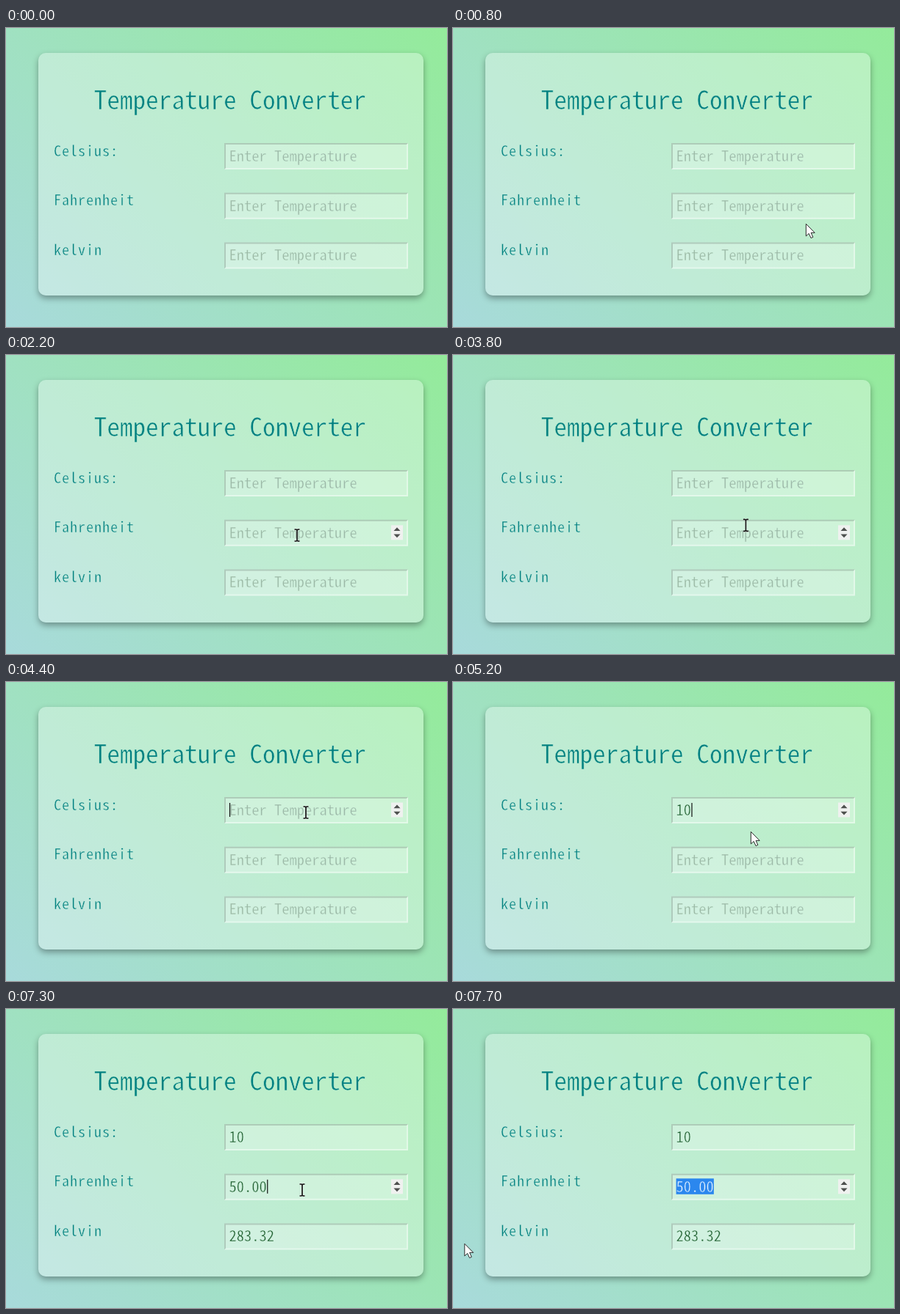
These frames come from a looping animation (600x408 px, 8 s). An HTML page:

```html
<!DOCTYPE html>
<html lang="en">
<head>
<meta charset="utf-8">
<title>Temperature Converter</title>
<style>
  html, body { margin: 0; width: 100%; height: 100%; overflow: hidden; }
  body { position: relative; background: linear-gradient(45deg, #a8dadb, #94eb9b); }
  .card {
    position: absolute; left: 44px; top: 34px; width: 524px; height: 331px;
    border-radius: 10px; background: rgba(255, 255, 255, .33);
    box-shadow: 0 4px 9px rgba(0, 0, 0, .34);
  }
  svg { position: absolute; left: 0; top: 0; }
  /* A hairline stroke in the ground colour slims the letters. */
  text {
    font-family: "Noto Sans Mono CJK KR", "Noto Sans Mono CJK JP", "Noto Sans Mono CJK SC",
      "Liberation Mono", monospace;
    fill: #008080; white-space: pre;
  }
  .title { font-size: 35.3px; stroke: #bbecd1; stroke-width: .7px; }
  .label { font-size: 20px; letter-spacing: 1px; stroke: #bfe9da; stroke-width: .4px; }
  .entry { font-size: 20.5px; font-weight: 300; stroke: #cdf0db; stroke-width: .45px; }
</style>
</head>
<body>
<div class="card"></div>
<svg id="stage" width="600" height="408" viewBox="0 0 600 408">
  <text class="title" x="119.5" y="111">Temperature Converter</text>
</svg>
<script>
const LOOP = 8000, STEP = 100;
const TEXT_X = 303.6, CHAR = 10.25;
const stage = document.getElementById('stage');

function add(parent, tag, attrs = {}, text = '') {
  const node = document.createElementNS('http://www.w3.org/2000/svg', tag);
  for (const name in attrs) node.setAttribute(name, attrs[name]);
  node.textContent = text;
  return parent.appendChild(node);
}

function show(node, on) {
  node.setAttribute('visibility', on ? 'visible' : 'hidden');
}

// One labelled number field; y is the top edge of its box.
function makeField(label, y) {
  add(stage, 'text', { class: 'label', x: 65, y: y + 17.5 }, label);
  const g = add(stage, 'g', { transform: `translate(0 ${y})` });
  add(g, 'rect', { x: 297, y: 0, width: 250, height: 36, fill: '#fff', 'fill-opacity': .27 });
  add(g, 'path', { d: 'M297 36V0H547L545 2H299V34Z', fill: '#6b7d72', 'fill-opacity': .33 });
  add(g, 'path', { d: 'M547 0V36H297L299 34H545V2Z', fill: '#fff', 'fill-opacity': .4 });
  const mark = add(g, 'rect', { y: 6.5, height: 21.5, fill: '#2b87ee' });
  const text = add(g, 'text', { class: 'entry', x: TEXT_X, y: 25 });
  const plain = add(text, 'tspan');
  const chosen = add(text, 'tspan', { fill: '#e4f2ff', stroke: '#2b87ee' });
  chosen.style.stroke = '#2b87ee';
  const caret = add(g, 'rect', { y: 8, width: 1.2, height: 19, fill: '#111' });
  const spin = add(g, 'g');
  add(spin, 'rect', { x: 524, y: 7.5, width: 16, height: 20, fill: '#eff1ef' });
  add(spin, 'path', { d: 'M527.5 15.3L532 10.5L536.5 15.3ZM527.5 19.7L532 24.5L536.5 19.7Z', fill: '#4d504e' });

  return {
    contains: (x, py) => x >= 297 && x <= 547 && py >= y && py <= y + 36,
    draw(value, caretOn, spinOn, selectFrom = value.length) {
      plain.textContent = value ? value.slice(0, selectFrom) : 'Enter Temperature';
      plain.setAttribute('fill', value ? '#1f5f30' : '#9bb8a6');
      chosen.textContent = value.slice(selectFrom);
      mark.setAttribute('x', TEXT_X + selectFrom * CHAR);
      mark.setAttribute('width', (value.length - selectFrom) * CHAR);
      caret.setAttribute('x', TEXT_X + value.length * CHAR + .3);
      show(caret, caretOn);
      show(spin, spinOn);
    }
  };
}

const celsius = makeField('Celsius:', 157);
const fahrenheit = makeField('Fahrenheit', 224.8);
const kelvin = makeField('kelvin', 292.4);

const arrow = add(stage, 'path', {
  d: 'M.3 .3V17L4.2 13.4L7 19.6L9.8 18.4L7.1 12.4H12.2Z',
  fill: '#fff', stroke: '#2a2a2a', 'stroke-width': 1, 'stroke-linejoin': 'round'
});
const beam = add(stage, 'g', { fill: 'none' });
const beamPath = 'M-3.5 -8H-1.2L0 -7L1.2 -8H3.5M0 -7V7M-3.5 8H-1.2L0 7L1.2 8H3.5';
add(beam, 'path', { d: beamPath, stroke: '#fff', 'stroke-opacity': .5, 'stroke-width': 3 });
add(beam, 'path', { d: beamPath, stroke: '#151515', 'stroke-width': 1.7 });

// Pointer path: time, x, y
const path = [
  [100, 520, 355], [800, 480, 267], [900, 478, 264], [1800, 430, 254],
  [2200, 396, 246], [3700, 396, 246], [4200, 408, 178], [4400, 408, 178],
  [4600, 405, 204], [6400, 405, 204], [6900, 402, 247], [7300, 403, 247],
  [7400, 365, 258], [7500, 285, 284], [7600, 130, 308], [7700, 15.5, 320]
];

function pointerAt(t) {
  const i = path.findIndex(p => p[0] > t);
  if (i < 0) return path[path.length - 1].slice(1);
  if (i === 0) return path[0].slice(1);
  const [t0, x0, y0] = path[i - 1], [t1, x1, y1] = path[i];
  const k = (t - t0) / (t1 - t0);
  return [x0 + (x1 - x0) * k, y0 + (y1 - y0) * k];
}

const within = (t, from, to) => t >= from && t < to;

function draw(t) {
  const [x, y] = pointerAt(t);
  const entered = t >= 100;
  const hovered = f => entered && f.contains(x, y);
  const converted = t >= 5900;
  const onCelsius = within(t, 4400, 6900);
  const onFahrenheit = t >= 6900;

  const typed = t < 5100 ? '' : t < 5200 ? '1' : '10';
  const blink = within(t, 4400, 4900) || within(t, 5100, 5700) || within(t, 6300, 6800);
  celsius.draw(typed, blink, onCelsius || hovered(celsius));

  const dragging = t >= 7400;
  const edge = Math.round((x - TEXT_X) / CHAR);
  const selectFrom = dragging ? Math.max(0, Math.min(5, edge)) : undefined;
  fahrenheit.draw(converted ? '50.00' : '', onFahrenheit && !dragging,
    onFahrenheit || hovered(fahrenheit), selectFrom);

  kelvin.draw(converted ? '283.32' : '', false, hovered(kelvin));

  const overField = [celsius, fahrenheit, kelvin].some(hovered);
  for (const shape of [arrow, beam]) shape.setAttribute('transform', `translate(${x} ${y})`);
  show(arrow, entered && !overField);
  show(beam, overField);
}

const start = performance.now();
function tick() {
  const t = (performance.now() - start) % LOOP;
  draw(Math.floor(t / STEP) * STEP);
  requestAnimationFrame(tick);
}
tick();
</script>
</body>
</html>
```
